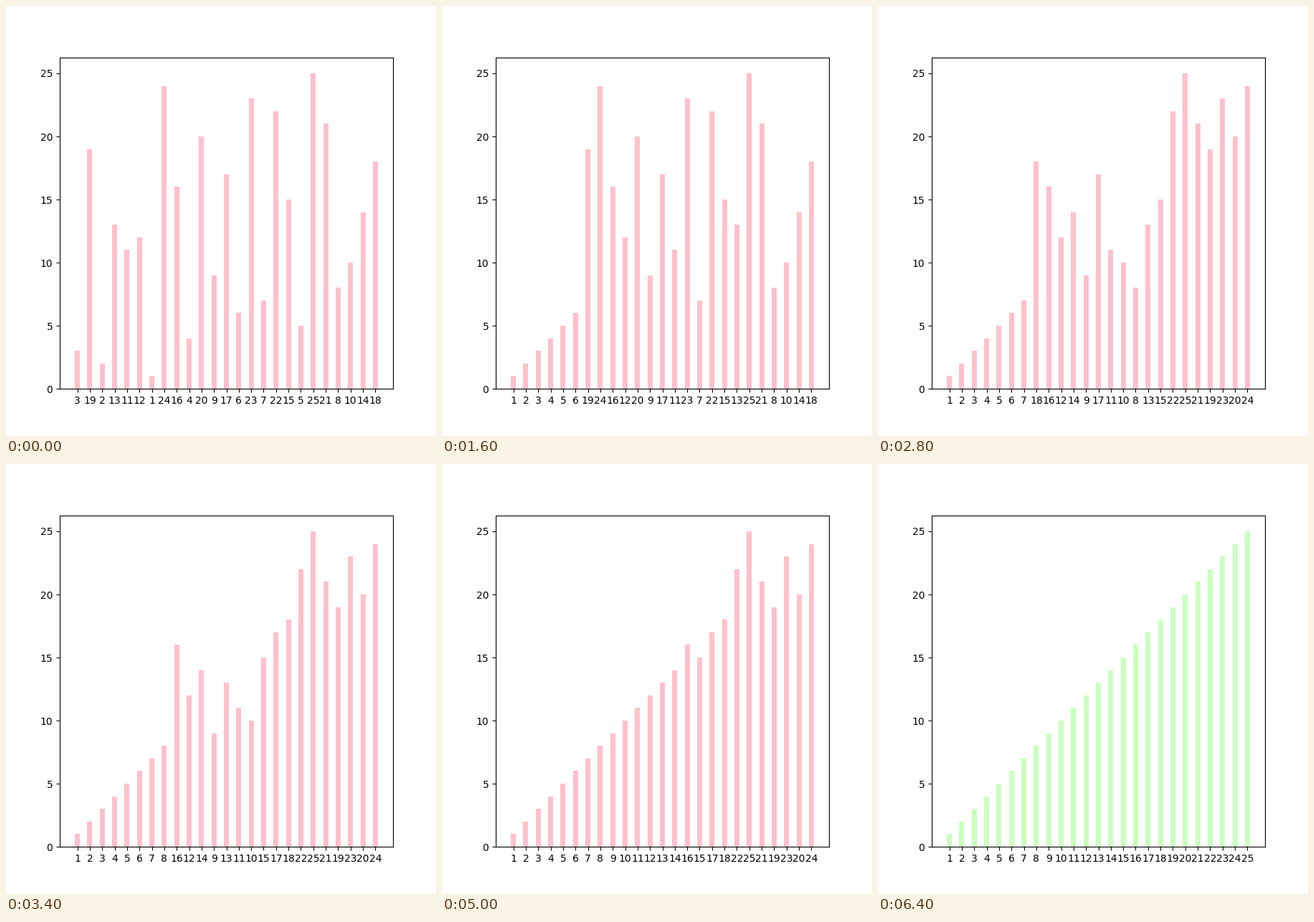
Recreate the animation shown at these times as a matplotlib script. Size 600x600 px, loop 7800 ms.

```python
import matplotlib.pyplot as plt
from matplotlib.animation import FuncAnimation

VALUES = [3, 19, 2, 13, 11, 12, 1, 24, 16, 4, 20, 9, 17,
          6, 23, 7, 22, 15, 5, 25, 21, 8, 10, 14, 18]
FRAMES = 39
INTERVAL = 200
PINK = "pink"
GREEN = "#caffbf"


def quicksort(a, lo, hi, states):
    """Sort a[lo..hi] in place, storing a copy after every swap."""
    if lo >= hi:
        return
    # The widest ranges take their pivot nearer the start.
    pivot = a[(lo + hi) // (4 if hi - lo > 22 else 2)]
    i, j = lo, hi
    while i <= j:
        while a[i] < pivot:
            i += 1
        while a[j] > pivot:
            j -= 1
        if i <= j:
            a[i], a[j] = a[j], a[i]
            states.append(a[:])
            i += 1
            j -= 1
    quicksort(a, lo, j, states)
    quicksort(a, i, hi, states)


ordered = sorted(VALUES)
states = [VALUES[:]]
quicksort(VALUES[:], 0, len(VALUES) - 1, states)

fig, ax = plt.subplots(figsize=(6, 6), dpi=100)
positions = range(len(VALUES))
bars = ax.bar(positions, VALUES, width=0.4, color=PINK)
ax.set_xticks(positions)


def update(frame):
    state = states[min(frame, len(states) - 1)]
    color = GREEN if state == ordered else PINK
    for bar, value in zip(bars, state):
        bar.set_height(value)
        bar.set_facecolor(color)
    ax.set_xticklabels(state)
    return list(bars)


def reset():
    return update(0)


anim = FuncAnimation(fig, update, frames=FRAMES, init_func=reset,
                     interval=INTERVAL, repeat=True)
plt.show()
```
